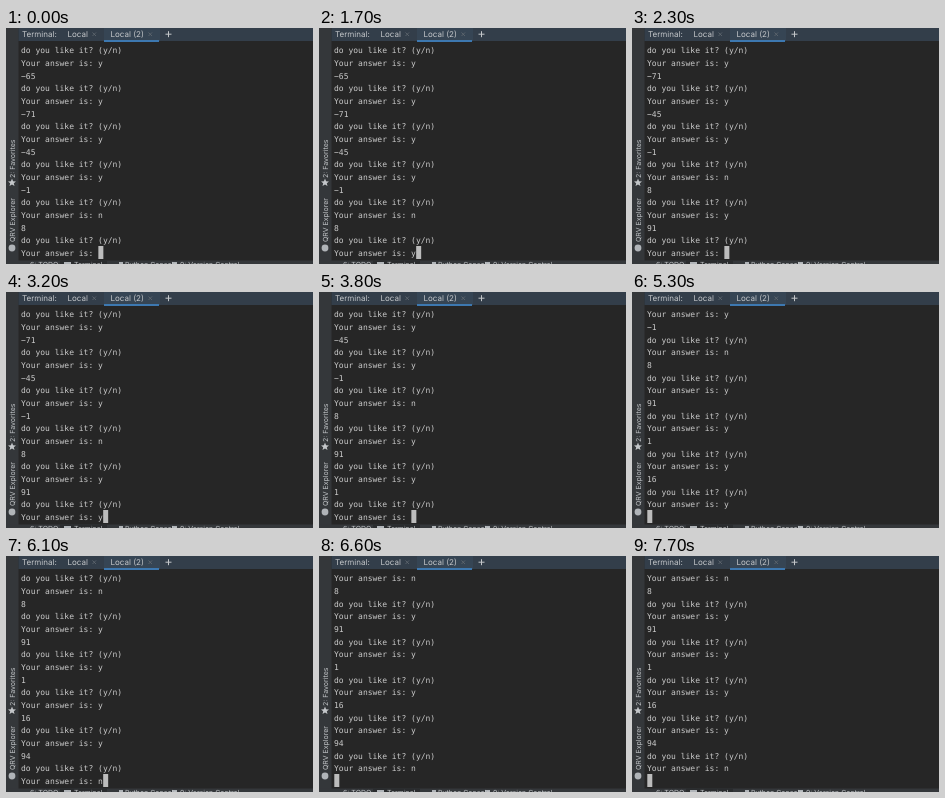
Animation, 307 px wide and 236 px high, one loop 8000 ms. Source, as an HTML page:

```html
<!DOCTYPE html>
<html lang="en">
<head>
<meta charset="utf-8">
<title>Terminal session</title>
<style>
  html, body { margin: 0; width: 100%; height: 100%; overflow: hidden; background: #262626; }
  svg { display: block; }
  text { white-space: pre; text-rendering: geometricPrecision; }
  .ui { font: 8px Inter, Roboto, sans-serif; fill: #c3c6c9; }
  .side { font-size: 7px; fill: #c3c6c9; }
  #rows { font: 8px "DejaVu Sans Mono", monospace; fill: #cbcbcb; }
</style>
</head>
<body>
<svg width="307" height="236" viewBox="0 0 307 236">
  <rect width="307" height="236" fill="#262626"/>

  <g id="rows"></g>
  <rect id="cursor" y="218" width="5" height="13" fill="#bcbcbc"/>

  <!-- side bar -->
  <rect width="12.5" height="236" fill="#34373a"/>
  <text class="ui side" transform="translate(8.6 150) rotate(-90)">2: Favorites</text>
  <path d="M6 150.5l1.1 2.7 2.9.2-2.2 1.9.7 2.8L6 156.5l-2.5 1.6.7-2.8L2 153.4l2.9-.2z" fill="#c3c6c9"/>
  <text class="ui side" transform="translate(8.6 214) rotate(-90)">QRV Explorer</text>
  <circle cx="6" cy="220" r="3.4" fill="#b0b4b8"/>

  <!-- tab bar -->
  <rect x="12.5" width="294.5" height="13" fill="#333e4a"/>
  <rect x="98" width="56" height="13" fill="#364554"/>
  <rect x="98" y="12" width="55" height="2" fill="#3d78b0"/>
  <g class="ui">
    <text x="16" y="9">Terminal:</text>
    <text x="61.5" y="9">Local</text>
    <text x="104.5" y="9">Local (2)</text>
  </g>
  <path d="M86.5 4.5l3.5 3.5m0-3.5l-3.5 3.5M142.5 4.5l3.5 3.5m0-3.5l-3.5 3.5" stroke="#626a72" stroke-width=".8"/>
  <path d="M159.5 6.2h6m-3-3v6" stroke="#c3c6c9"/>

  <!-- bottom bar, cut off by the stage -->
  <rect y="232.5" width="307" height="3.5" fill="#34373a"/>
  <rect x="54" y="232.5" width="47" height="3.5" fill="#2a2c2e"/>
  <path d="M58 234h7v2h-7zM113 234h4v2h-4zM166 234h5v2h-5z" fill="#b0b4b8"/>
  <g class="ui side">
    <text x="24" y="239">6: TODO</text>
    <text x="68" y="239">Terminal</text>
    <text x="119" y="239">Python Console</text>
    <text x="174" y="239">9: Version Control</text>
  </g>
</svg>
<script>
const LOOP = 8000, ROWS = 17, PITCH = 12.68, LEFT = 15, CELL = 4.816;
const ask = 'do you like it? (y/n)\nYour answer is: ';
const reply = n => String(n).replace('-', '−') + '\n' + ask;

// [time, output added to the session]
const output = [
  [0, ask + 'y\n' + reply(-65) + 'y\n' + reply(-71) + 'y\n' + reply(-45) +
      'y\n' + reply(-1) + 'n\n' + reply(8)],
  [1700, 'y'], [2000, '\n'], [2300, reply(91)],
  [3200, 'y'], [3500, '\n'], [3800, reply(1)],
  [4200, 'y'], [4400, '\n'], [4700, reply(16)],
  [5100, 'y'], [5300, '\n'], [5600, reply(94)],
  [6100, 'n'], [6600, '\n'],
];
const cursorOff = [[100, 600], [1100, 1600], [2800, 3200], [7100, 7700]];

const group = document.getElementById('rows');
const cursor = document.getElementById('cursor');
const rows = Array.from({ length: ROWS }, (_, i) => {
  const row = document.createElementNS('http://www.w3.org/2000/svg', 'text');
  row.setAttribute('x', LEFT);
  row.setAttribute('y', 228.1 - (ROWS - 1 - i) * PITCH);
  return group.appendChild(row);
});

function draw(t) {
  const session = output.filter(([at]) => at <= t).map(([, s]) => s).join('');
  const lines = session.split('\n').slice(-ROWS);
  rows.forEach((row, i) => {
    if (row.textContent !== lines[i]) row.textContent = lines[i];
  });
  cursor.setAttribute('x', LEFT + lines[ROWS - 1].length * CELL + .3);
  const hidden = cursorOff.some(([from, to]) => t >= from && t < to);
  cursor.setAttribute('visibility', hidden ? 'hidden' : 'visible');
}

const start = performance.now();
function tick() {
  draw((performance.now() - start) % LOOP);
  requestAnimationFrame(tick);
}
tick();
</script>
</body>
</html>
```
